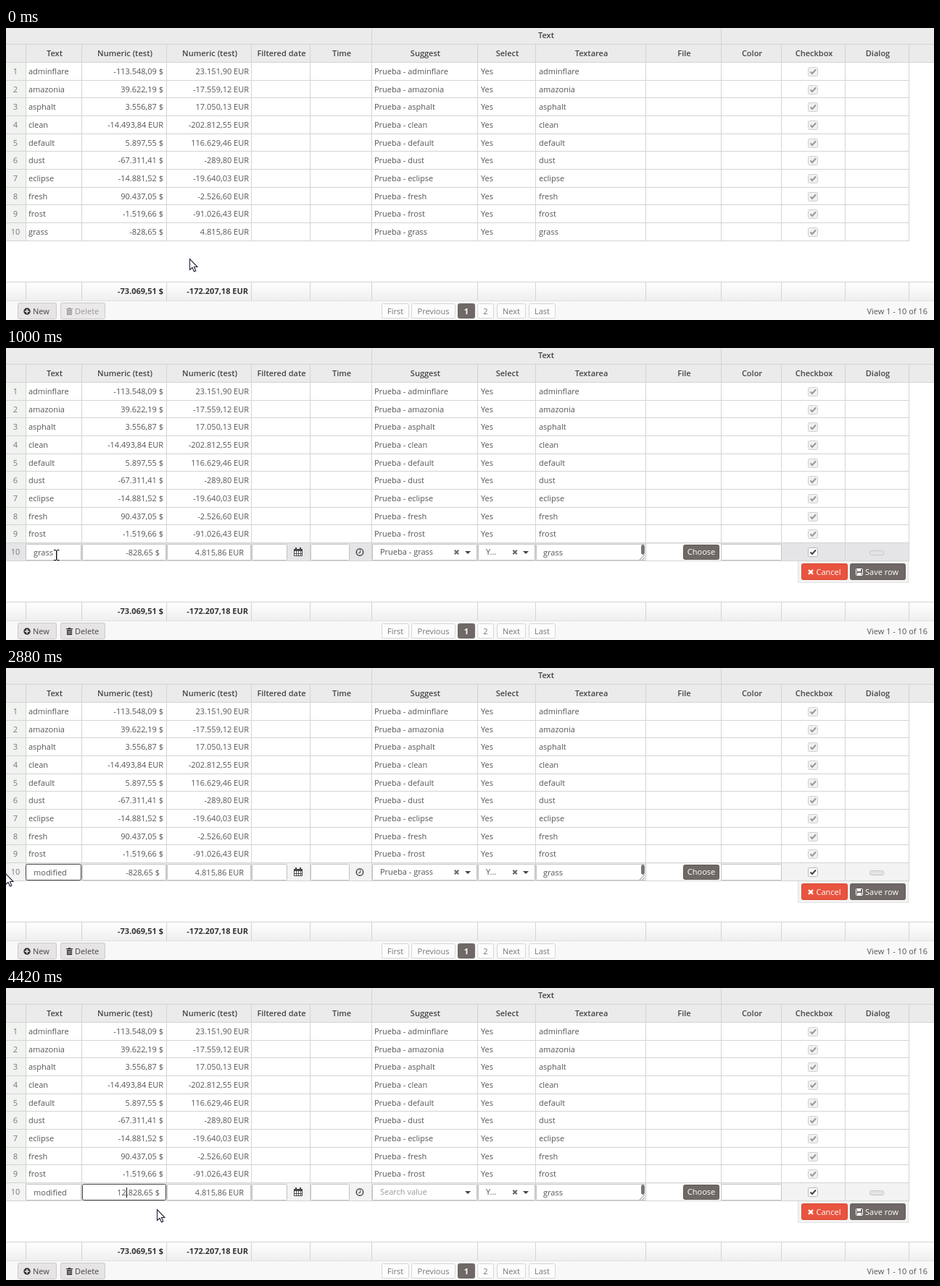
An HTML page with a canvas for the animation above (4.52 s loop, 1280 px wide and 404 px high).

```html
<!DOCTYPE html>
<html lang="en">
<head>
<meta charset="utf-8">
<title>Inline row editing</title>
<style>
html, body { margin: 0; width: 100%; height: 100%; overflow: hidden; background: #fff; }
canvas { display: block; }
</style>
</head>
<body>
<canvas id="stage" width="1280" height="404"></canvas>
<script>
const c = document.getElementById('stage').getContext('2d');
const LOOP = 4520, EDIT = 900, DRAG = 1120, NEXT_FIELD = 3420;
const DARK = '#6f6866', INK = '#555', LINE = '#d0d6d0';

const edges = [0, 27, 104, 221, 338, 419, 504, 650, 730, 882, 986, 1069, 1157, 1245];
const heads = ['Text', 'Numeric (test)', 'Numeric (test)', 'Filtered date', 'Time', 'Suggest',
  'Select', 'Textarea', 'File', 'Color', 'Checkbox', 'Dialog'];
const rows = [
  ['adminflare', '-113.548,09 $', '23.151,90 EUR'],
  ['amazonia', '39.622,19 $', '-17.559,12 EUR'],
  ['asphalt', '3.556,87 $', '17.050,13 EUR'],
  ['clean', '-14.493,84 EUR', '-202.812,55 EUR'],
  ['default', '5.897,55 $', '116.629,46 EUR'],
  ['dust', '-67.311,41 $', '-289,80 EUR'],
  ['eclipse', '-14.881,52 $', '-19.640,03 EUR'],
  ['fresh', '90.437,05 $', '-2.526,60 EUR'],
  ['frost', '-1.519,66 $', '-91.026,43 EUR'],
  ['grass', '-828,65 $', '4.815,86 EUR']
];
const rowY = i => Math.round(48 + 24.68 * i);
const keyTimes = [1880, 2020, 2080, 2140, 2200, 2260, 2520, 2560];

// pointer stops: time, x, y
const path = [[300, 253, 319], [820, 69, 277], [980, 69, 286], [DRAG, 69, 286], [1450, -1, 284],
  [2960, -1, 284], [3240, 161, 286], [3400, 161, 286], [3480, 168, 286], [3660, 208, 306]];

function pointer(t) {
  let a = path[0];
  for (const b of path) {
    if (t < b[0]) {
      const p = Math.max(0, (t - a[0]) / (b[0] - a[0] || 1)), e = p * p * (3 - 2 * p);
      return [a[1] + (b[1] - a[1]) * e, a[2] + (b[2] - a[2]) * e];
    }
    a = b;
  }
  return [a[1], a[2]];
}

function rect(x, y, w, h, color) {
  c.fillStyle = color;
  c.fillRect(x, y, w, h);
}

function box(x, y, w, h, fill, stroke, r = 2) {
  c.beginPath();
  c.roundRect(x + .5, y + .5, w - 1, h - 1, r);
  c.fillStyle = fill;
  c.fill();
  c.lineWidth = 1;
  c.strokeStyle = stroke;
  c.stroke();
}

function text(s, x, y, { align = 'left', color = INK, weight = 400 } = {}) {
  c.font = `${weight} 11px "Open Sans", sans-serif`;
  c.textAlign = align;
  c.fillStyle = color;
  c.fillText(s, x, y);
}

function width(s) {
  c.font = '400 11px "Open Sans", sans-serif';
  return c.measureText(s).width;
}

function shape(points, fill, stroke, x = 0, y = 0) {
  c.beginPath();
  for (let i = 0; i < points.length; i += 2) c.lineTo(x + points[i], y + points[i + 1]);
  c.closePath();
  if (fill) { c.fillStyle = fill; c.fill(); }
  if (stroke) { c.strokeStyle = stroke; c.lineWidth = 1.1; c.stroke(); }
}

function stroke(points, color, w) {
  c.beginPath();
  for (let i = 0; i < points.length; i += 2) c.lineTo(points[i], points[i + 1]);
  c.strokeStyle = color;
  c.lineWidth = w;
  c.stroke();
}

function cross(x, y, r, color, w) {
  stroke([x - r, y - r, x + r, y + r], color, w);
  stroke([x - r, y + r, x + r, y - r], color, w);
}

function check(y, live) {
  box(1106, y - 6, 14, 13, live ? '#fff' : '#f1f1f1', live ? '#b5b5b5' : '#cfcfcf');
  stroke([1109.5, y + .5, 1112, y + 3, 1117, y - 2.5], live ? '#444' : '#999', 2);
}

function gradient(y, h, top, bottom) {
  const g = c.createLinearGradient(0, y, 0, y + h);
  g.addColorStop(0, top);
  g.addColorStop(1, bottom);
  rect(0, y, 1280, h, g);
}

function drawHeader() {
  rect(0, 0, 1280, 48, '#ebebeb');
  rect(0, 22, 1280, 1, LINE);
  rect(0, 47, 1280, 1, LINE);
  const style = { align: 'center', color: '#444', weight: 600 };
  text('Text', 745, 14, style);
  heads.forEach((h, i) => text(h, (edges[i + 1] + edges[i + 2]) / 2 + 1.5, 39, style));
  edges.slice(1).forEach(x => rect(x, x === 504 || x === 986 ? 0 : 22, 1, 26, LINE));
  rect(504, 22, 1, 26, LINE);
  rect(986, 22, 1, 26, LINE);
}

function drawRow(row, i, hover, editing) {
  const y = rowY(i), h = rowY(i + 1) - y, base = Math.round(64 + 24.66 * i);
  rect(0, y, 27, h, '#f1f3f1');
  if (hover) rect(0, y, 1245, h, '#e5e5e8');
  else if (editing) rect(0, y, 1245, h, '#f3f3f3');
  rect(0, y + h - 1, 1245, 1, LINE);
  edges.slice(1).forEach(x => rect(x, y, 1, h, LINE));
  text(i + 1, 13, base, { align: 'center', color: '#777' });
  if (editing) return;
  const [name, first, second] = row;
  text(name, 31, base);
  text(first, 217, base, { align: 'right' });
  text(second, 335, base, { align: 'right' });
  text('Prueba - ' + name, 508, base);
  text('Yes', 655, base);
  text(name, 735, base);
  check(base - 4, false);
}

function drawFooter(editing) {
  gradient(351, 26, '#fff', '#efefef');
  rect(0, 351, 1280, 1, '#d2d2d2');
  rect(0, 377, 1280, 27, '#f8f8f8');
  rect(0, 377, 1280, 1, '#e0e0e0');
  edges.slice(1).forEach(x => rect(x, 352, 1, 25, LINE));
  const total = { align: 'right', color: '#333', weight: 700 };
  text('-73.069,51 $', 217, 368, total);
  text('-172.207,18 EUR', 334, 368, total);

  box(16, 380, 54, 23, '#e6e4e4', '#cdcaca');
  c.beginPath();
  c.arc(29, 392, 4.7, 0, 7);
  c.fillStyle = '#333';
  c.fill();
  stroke([26, 392, 32, 392], '#e6e4e4', 1.6);
  stroke([29, 389, 29, 395], '#e6e4e4', 1.6);
  text('New', 37, 396, { color: '#444' });

  const ink = editing ? '#333' : '#999';
  box(75, 380, 62, 23, editing ? '#e6e4e4' : '#ebe9e9', '#cdcaca');
  rect(83, 388, 9, 1.3, ink);
  rect(86, 387, 3, 1, ink);
  rect(84, 390, 7, 7, ink);
  [85.5, 87.3, 89.1].forEach(x => rect(x, 391, .7, 5, '#e6e4e4'));
  text('Delete', 95, 396, { color: editing ? '#444' : '#999' });

  [['First', 518, 38], ['Previous', 559, 61], ['1', 623, 24], ['2', 650, 23], ['Next', 677, 40], ['Last', 721, 37]]
    .forEach(([s, x, w]) => {
      const on = s === '1';
      box(x, 381, w, 21, on ? DARK : '#fcfcfc', on ? DARK : '#d6d6d6');
      text(s, x + w / 2, 396, { align: 'center', color: on ? '#fff' : '#777', weight: on ? 700 : 400 });
    });
  text('View 1 - 10 of 16', 1271, 396, { align: 'right' });
}

function drawNameField(t, x) {
  const typed = keyTimes.filter(k => t >= k).length;
  const value = typed ? 'modified'.slice(0, typed) : 'grass';
  text(value, 38, 287);
  if (t < DRAG || t >= NEXT_FIELD) return;
  if (typed) {
    if (t < 2880 || t >= 3380) rect(Math.round(38 + width(value)), 276, 1, 14, '#111');
    return;
  }
  let n = 0;
  while (n < 5 && 38 + width(value.slice(0, n)) < x - 3) n++;
  const from = 38 + width(value.slice(0, n)), end = 38 + width(value);
  if (n === 5) return rect(Math.round(end), 276, 1, 14, '#111');
  rect(from - .5, 276, end - from + .5, 15, '#338fff');
  text(value.slice(n), from, 287, { color: '#fff' });
}

function drawAmountField(t) {
  const value = t < 4380 ? '-828,65 $' : t < 4420 ? '1.828,65 $' : '12.828,65 $';
  const left = 212 - width(value);
  text(value, 212, 287, { align: 'right' });
  if (t >= 4380) rect(Math.round(left + width(value.split('.')[0])), 276, 1, 14, '#111');
  else if (t >= 3460) {
    rect(left, 276, width('-'), 15, '#338fff');
    text('-', left, 287, { color: '#fff' });
  }
}

function drawEditor(t, x) {
  const focus = t >= NEXT_FIELD ? 1 : t >= DRAG ? 0 : -1;
  [[27, 77], [105, 116], [222, 116], [339, 49], [420, 54], [505, 145], [651, 79], [731, 152], [883, 103], [986, 84]]
    .forEach(([left, w], i) => {
      if (i === 8) rect(left, 271, w, 23, '#fff');
      else box(left, 271, w, 23, '#fff', i === focus ? '#444' : '#bfc3bf', i === focus ? 2 : 1);
    });
  drawNameField(t, x);
  drawAmountField(t);
  text('4.815,86 EUR', 328, 287, { align: 'right' });

  // calendar and clock
  box(397, 278, 12, 10, '#fff', '#444', 0);
  rect(397, 278, 12, 3, '#444');
  [400, 403, 406].forEach(v => rect(v, 281, 1, 7, '#555'));
  rect(397, 284, 12, 1, '#555');
  rect(399, 276, 2, 3, '#444');
  rect(405, 276, 2, 3, '#444');
  c.beginPath();
  c.arc(488, 282.5, 4.7, 0, 7);
  c.strokeStyle = '#444';
  c.lineWidth = 1.5;
  c.stroke();
  stroke([488.5, 279.5, 488.5, 283.5, 486, 283.5], '#444', 1);

  if (t < NEXT_FIELD) {
    text('Prueba - grass', 516, 286);
    cross(621.5, 282.5, 2.7, '#666', 2);
  } else text('Search value', 516, 286, { color: '#999' });
  text('Y...', 662, 286);
  cross(702, 282.5, 2.7, '#666', 2);
  [637, 717].forEach(v => shape([-4, 0, 4, 0, 0, 4], '#444', null, v, 281));

  text('grass', 741, 287);
  box(876, 272, 5, 14, '#777', '#777', 2);
  stroke([874, 293, 881, 286], '#888', 1);
  stroke([878, 293, 881, 290], '#888', 1);

  box(934, 272, 50, 21, DARK, '#625c5a');
  text('Choose', 959, 286, { align: 'center', color: '#fff' });
  check(282, true);
  box(1191, 280, 20, 7, '#e4e2e4', '#c9c6c9');

  rect(1092, 295, 153, 30, '#f3f3f3');
  stroke([1092.5, 295, 1092.5, 324.5, 1244.5, 324.5, 1244.5, 295], '#e2e2e2', 1);
  box(1097, 298, 64, 23, '#e8543f', '#d9472f');
  cross(1110, 310, 2.9, '#fff', 2.4);
  text('Cancel', 1117.5, 314, { color: '#fff' });
  box(1164, 298, 77, 23, DARK, '#625c5a');
  box(1172, 305, 10, 10, DARK, '#fff', 1);
  rect(1174, 305, 5, 4, '#fff');
  rect(1174, 311, 6, 3, '#fff');
  text('Save row', 1185, 314, { color: '#fff' });
}

function drawPointer(x, y, kind) {
  x = Math.round(x);
  y = Math.round(y);
  if (kind === 'beam') {
    rect(x, y - 6, 1.4, 13, '#111');
    [y - 7, y + 7].forEach(v => {
      rect(x - 3, v, 3, 1.2, '#111');
      rect(x + 1.4, v, 3, 1.2, '#111');
    });
  } else if (kind === 'hand') {
    c.beginPath();
    c.moveTo(x - 2, y + 13);
    c.lineTo(x - 2, y + 1);
    c.quadraticCurveTo(x, y - 2, x + 2, y + 1);
    c.lineTo(x + 2, y + 6.5);
    c.quadraticCurveTo(x + 8.5, y + 7, x + 9, y + 10);
    c.lineTo(x + 8.5, y + 15);
    c.lineTo(x + 6.5, y + 20);
    c.lineTo(x - 1, y + 20);
    c.lineTo(x - 6, y + 12);
    c.quadraticCurveTo(x - 5, y + 9, x - 2, y + 13);
    c.closePath();
    c.fillStyle = '#fff';
    c.fill();
    c.strokeStyle = '#222';
    c.lineWidth = 1.2;
    c.stroke();
    [2, 4.5, 7].forEach(d => stroke([x + d, y + 7.5, x + d, y + 11], '#222', 1));
  } else shape([0, 0, 0, 15, 3.5, 12, 6, 17.5, 8.3, 16.5, 6, 11, 10.5, 11], '#fff', '#22223a', x + .5, y + .5);
}

function draw() {
  const t = performance.now() % LOOP;
  const [x, y] = pointer(t);
  const editing = t >= EDIT;
  const hover = x > 2 && y >= 270 && y < 295;
  rect(0, 0, 1280, 404, '#fff');
  drawHeader();
  rows.forEach((row, i) => drawRow(row, i, i === 9 && hover, i === 9 && editing));
  drawFooter(editing);
  if (editing) drawEditor(t, x);
  drawPointer(x, y, !hover || (editing && x < 27) ? 'arrow' : editing ? 'beam' : 'hand');
  requestAnimationFrame(draw);
}
draw();
</script>
</body>
</html>
```
